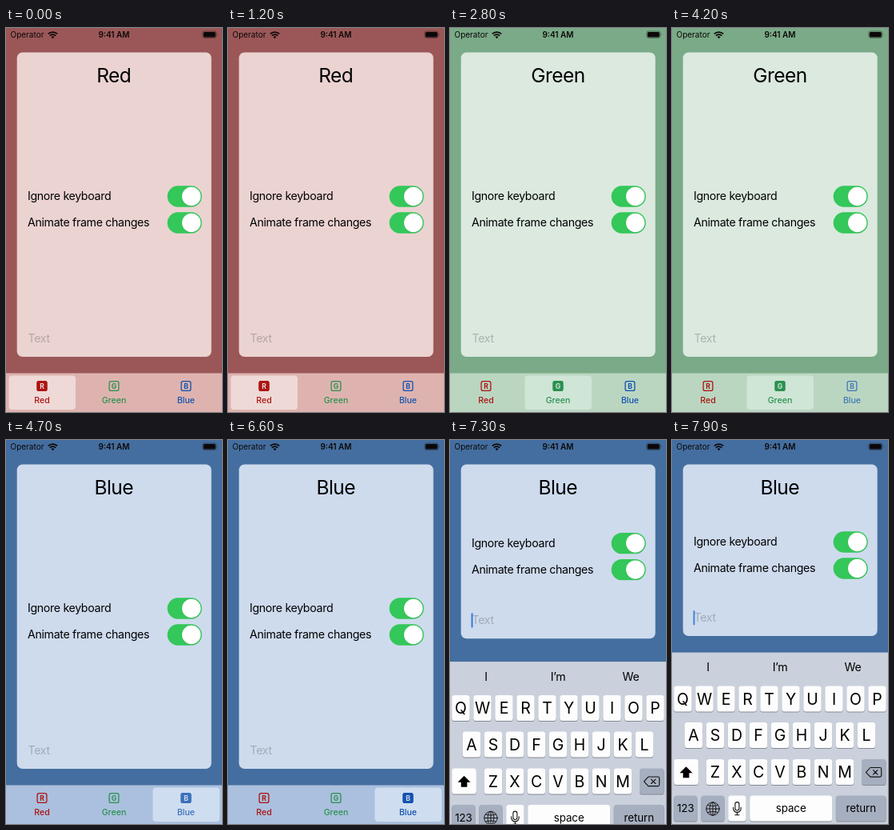
Write an HTML page that moves like this. It is 270x480 px and loops after 8000 ms.

```html
<!DOCTYPE html>
<html lang="en">
<head>
<meta charset="utf-8">
<title>Tabs and keyboard</title>
<style>
@property --bg { syntax: "<color>"; inherits: true; initial-value: #9b5757; }
@property --card { syntax: "<color>"; inherits: true; initial-value: #ebd3d2; }
@property --bar { syntax: "<color>"; inherits: true; initial-value: #deb3af; }
@property --pill { syntax: "<color>"; inherits: true; initial-value: #eed9d7; }

html, body { margin: 0; width: 100%; height: 100%; overflow: hidden; }
svg {
  display: block; width: 100%; height: 100%;
  font-family: Inter, Roboto, sans-serif;
  animation: theme 8s linear infinite;
}
.mid { text-anchor: middle; }
.bg { fill: var(--bg); }
.bar { fill: var(--bar); }
.pill, .cut { fill: var(--pill); }
.card { fill: var(--card); height: 380.5px; animation: shrink 8s linear infinite; }
.status { font-size: 10px; fill: #0c0808; }
.title { font-size: 24.5px; letter-spacing: -.55px; }
.body { font-size: 14.2px; letter-spacing: -.34px; }
.hint { fill: rgba(60, 60, 67, .3); }
.rise { animation: rise 8s linear infinite; }
.caret { animation: caret 8s linear infinite; }

.red { color: #ab1512; }
.green { color: #2b9150; }
.blue { color: #1352ae; }
.tab { fill: currentColor; font-size: 10.6px; font-weight: 500; }
.glyph { font-size: 8.6px; font-weight: 700; }
.on-red { animation: on-red 8s linear infinite; }
.on-green { animation: on-green 8s linear infinite; }
.on-blue { animation: on-blue 8s linear infinite; }
.green.tab, .blue.tab { animation: press 8s linear infinite; }
.blue.tab { animation-delay: -5.9s; }

.keyboard { animation: slide 8s linear infinite; }
.letter { font-size: 19.5px; }
.word { font-size: 13.4px; letter-spacing: -.1px; }
.late { animation: late 8s linear infinite; }

@keyframes theme {
  0%, 28.125% { --bg: #9b5757; --card: #ebd3d2; --bar: #deb3af; --pill: #eed9d7; }
  31.875%, 54.375% { --bg: #7aaa87; --card: #dbe9df; --bar: #bad6c1; --pill: #cfe5d6; }
  58.125%, 100% { --bg: #446e9f; --card: #cedbed; --bar: #abc0de; --pill: #cfddf0; }
}
@keyframes on-red { 0%, 28.125% { opacity: 1; } 31.875%, 100% { opacity: 0; } }
@keyframes on-green {
  0%, 28.125% { opacity: 0; } 31.875%, 54.375% { opacity: 1; } 58.125%, 100% { opacity: 0; }
}
@keyframes on-blue { 0%, 54.375% { opacity: 0; } 58.125%, 100% { opacity: 1; } }
@keyframes press {
  0%, 25.625% { opacity: 1; } 27.5%, 28.75% { opacity: .14; } 33.75%, 100% { opacity: 1; }
}
@keyframes caret {
  0%, 83.1% { opacity: 0; } 83.75%, 97.5% { opacity: 1; } 100% { opacity: .8; }
}
@keyframes shrink {
  0% { height: 380.5px; }
  86.125% { height: 380.5px; animation-timing-function: cubic-bezier(.38, .7, .125, 1); }
  93.625%, 100% { height: 214.5px; }
}
@keyframes rise {
  0% { transform: translateY(0); }
  86.125% { transform: translateY(0); animation-timing-function: cubic-bezier(.38, .7, .125, 1); }
  93.625%, 100% { transform: translateY(var(--rise)); }
}
@keyframes slide {
  0% { transform: translateY(216px); }
  86.125% { transform: translateY(216px); animation-timing-function: cubic-bezier(.38, .7, .125, 1); }
  95.625%, 100% { transform: translateY(0); }
}
@keyframes late { 0%, 88.75% { fill-opacity: .5; } 91.25%, 100% { fill-opacity: 1; } }
</style>
</head>
<body>
<svg viewBox="0 0 270 480" preserveAspectRatio="none">
  <rect class="bg" width="270" height="480"/>

  <g class="status">
    <text x="5.5" y="12">Operator</text>
    <text class="mid" x="135" y="12" font-weight="600">9:41 AM</text>
    <g fill="none" stroke="#0c0808" stroke-width="1.7">
      <path d="M52.8 7.4a8.2 8.2 0 0 1 11.4 0M54.8 9.7a5.3 5.3 0 0 1 7.4 0"/>
    </g>
    <path d="M58.5 13.2l-2-2.1a2.9 2.9 0 0 1 4 0z"/>
    <rect x="245.8" y="4" width="17" height="8.4" rx="2.4" fill="none" stroke="#0c0808" stroke-opacity=".5" stroke-width=".8"/>
    <rect x="246.8" y="5" width="15" height="6.4" rx="1.5"/>
    <path d="M263.8 6.8q1.4 1.4 0 2.8z" opacity=".6"/>
  </g>

  <rect class="card" x="13.7" y="30.5" width="243" rx="7"/>
  <g class="title mid">
    <text class="on-red" x="134.7" y="68">Red</text>
    <text class="on-green" x="135" y="68">Green</text>
    <text class="on-blue" x="134.7" y="68">Blue</text>
  </g>

  <g class="rise body" style="--rise:-83px">
    <text x="27" y="215">Ignore keyboard</text>
    <text x="27" y="248">Animate frame changes</text>
    <g id="toggles"></g>
  </g>
  <g class="rise body" style="--rise:-166px">
    <text class="hint" x="27.5" y="393">Text</text>
    <rect class="caret" x="26.6" y="379" width="1.9" height="18.5" rx=".9" fill="#2a78d8"/>
  </g>

  <rect class="bar" y="431.5" width="270" height="48.5"/>
  <g id="tabs" class="mid"></g>

  <g class="keyboard mid">
    <rect y="265.6" width="270" height="216" fill="#cad1dc"/>
    <g class="body">
      <text x="45" y="289">I</text>
      <text x="135" y="289">I’<tspan class="late">m</tspan></text>
      <text x="226" y="289">W<tspan class="late">e</tspan></text>
    </g>
    <g id="keys"></g>
    <path d="M17.6 408.2l8 8h-4.2v6h-7.6v-6h-4.2z"/>
    <g fill="none" stroke="#111" stroke-width="1.1" stroke-linejoin="round" stroke-linecap="round">
      <path d="M242.5 415.3l5.4-5.8h12q1.8 0 1.8 1.8v8q0 1.8-1.8 1.8h-12zM251.5 412.6l5.4 5.4m0-5.4l-5.4 5.4"/>
      <g stroke-width=".9">
        <circle cx="51" cy="461" r="8.2"/>
        <ellipse cx="51" cy="461" rx="3.9" ry="8.2"/>
        <path d="M42.8 461h16.4M51 452.8v16.4M44.3 456.5q6.7 2.6 13.4 0M44.3 465.5q6.7-2.6 13.4 0"/>
      </g>
      <rect x="78.9" y="452.6" width="5" height="10.4" rx="2.5"/>
      <path d="M76.6 459.4v1.2a4.8 4.8 0 0 0 9.6 0v-1.2M81.4 465.4v3.4m-2.6 0h5.2"/>
    </g>
  </g>
</svg>
<script>
const fill = (id, parts) => { document.getElementById(id).innerHTML = parts.join(""); };

const toggle = y => `
  <rect x="201.7" y="${y - 13.2}" width="43.1" height="26.4" rx="13.2" fill="#34c759"/>
  <circle cx="231.7" cy="${y + .6}" r="11.9" fill="#000" opacity=".1"/>
  <circle cx="231.7" cy="${y}" r="11.7" fill="#fff"/>`;
fill("toggles", [210.5, 243.5].map(toggle));

const tab = (name, i) => {
  const x = 45 + 90 * i;
  const key = name.toLowerCase();
  const glyph = cls => `<text class="glyph ${cls}" x="${x}" y="450.6">${name[0]}</text>`;
  return `
    <rect class="pill on-${key}" x="${x - 41.5}" y="434.5" width="83.5" height="42.5" rx="4"/>
    <g class="tab ${key}">
      <rect x="${x - 5.9}" y="441.6" width="11.8" height="11.8" rx="2.2" fill="none" stroke="currentColor" stroke-width="1.3"/>
      ${glyph("")}
      <g class="on-${key}">
        <rect x="${x - 6.5}" y="441" width="13" height="13" rx="2.6"/>
        ${glyph("cut")}
      </g>
      <text x="${x}" y="468.5">${name}</text>
    </g>`;
};
fill("tabs", ["Red", "Green", "Blue"].map(tab));

const WHITE = "#fdfdfe", GRAY = "#a6afbf";
const key = (x, y, w, label = "", color = WHITE) => `
  <rect x="${x}" y="${y + 1}" width="${w}" height="32" rx="3.6" fill="#858a94"/>
  <rect x="${x}" y="${y}" width="${w}" height="32" rx="3.6" fill="${color}"/>
  <text class="${label.length > 1 ? "word" : "letter"}" x="${x + w / 2}"
    y="${y + (label.length > 1 ? 20.8 : 23)}">${label}</text>`;
const row = (letters, x, y) => [...letters].map((c, i) => key(x + 27 * i, y, 22.4, c));

fill("keys", [
  ...row("QWERTYUIOP", 2.3, 307.5),
  ...row("ASDFGHJKL", 15.8, 353),
  ...row("ZXCVBNM", 42.8, 399),
  key(2.3, 399, 30.6),
  key(237, 399, 30.7, "", GRAY),
  key(2.3, 444.5, 29.4, "123", GRAY),
  key(36.3, 444.5, 29.4, "", GRAY),
  key(70.2, 444.5, 22.4),
  key(97.2, 444.5, 103, "space"),
  key(204.8, 444.5, 62.9, "return", GRAY)
]);
</script>
</body>
</html>
```
